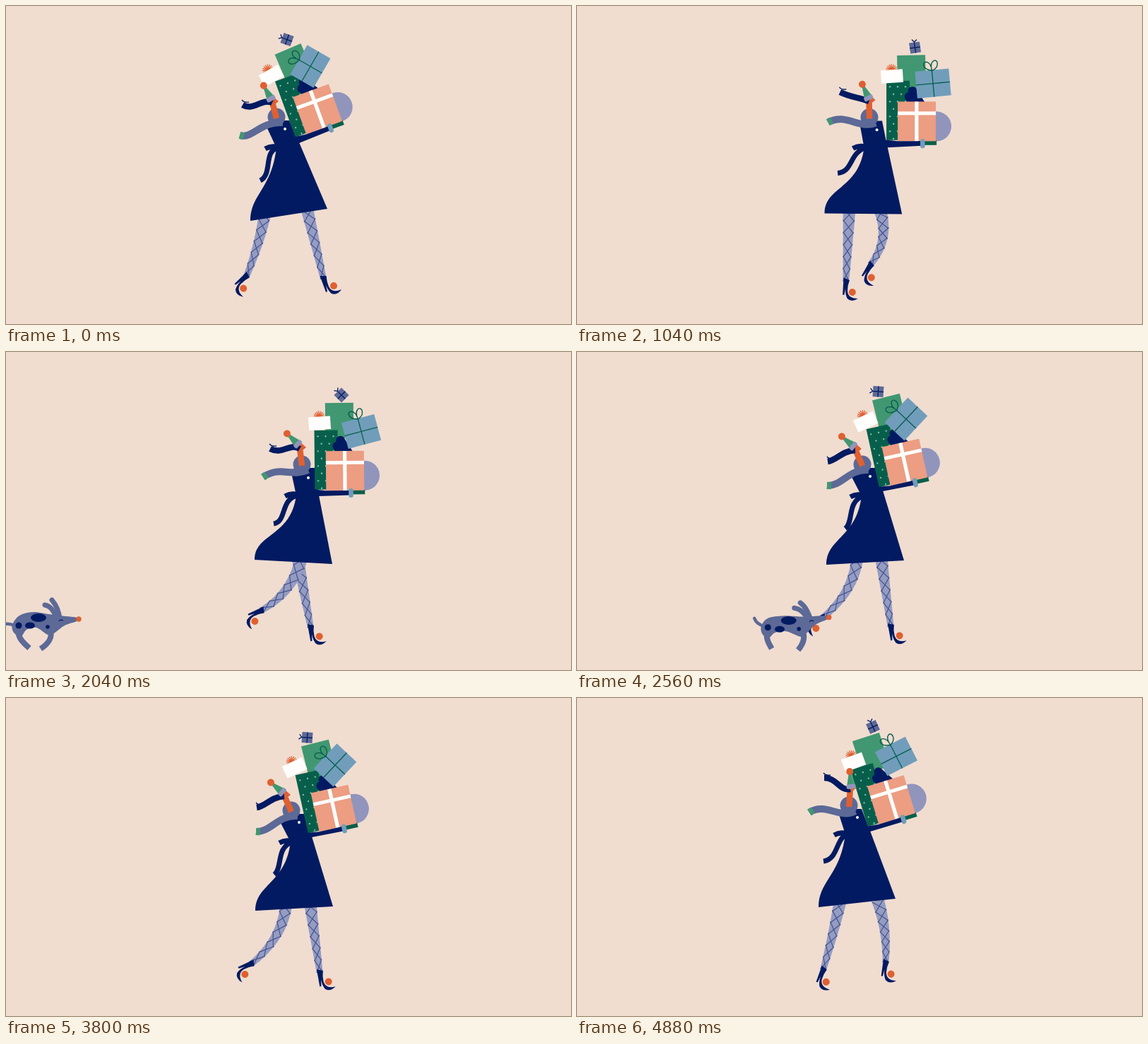
Animation of 800x450 px, one loop 4.92 s. Source, as an HTML page:

```html
<!DOCTYPE html>
<html lang="en">
<head>
<meta charset="utf-8">
<title>Gift walk</title>
<style>
html, body { margin: 0; width: 100%; height: 100%; overflow: hidden; background: #f0ddd0; }
svg { display: block; width: 100vw; height: 100vh; }
</style>
</head>
<body>
<svg id="stage" viewBox="0 0 800 450"></svg>
<script>
const LOOP = 4920, STEP = 40, STRIDE = 31, BOB = 16;
const C = {
  navy: '#021a61', slate: '#5d6996', lilac: '#959cc1', net: '#465390', pine: '#075f4b',
  green: '#419771', blue: '#719dbb', pink: '#ec9d82', ball: '#9195bb', red: '#df6031',
  dot: '#86bba6', white: '#fffefc'
};
const stage = document.getElementById('stage');

// Smooth periodic interpolation through rows of [time, ...values].
function track(period, rows) {
  const n = rows.length;
  const row = i => {
    const lap = Math.floor(i / n), r = rows[i - lap * n];
    return { t: r[0] + lap * period, v: r.slice(1) };
  };
  return p => {
    let i = n - 1;
    while (i > 0 && rows[i][0] > p) i--;
    const [a, b, c, d] = [row(i - 1), row(i), row(i + 1), row(i + 2)];
    const h = c.t - b.t, u = (p - b.t) / h, u2 = u * u, u3 = u2 * u;
    return b.v.map((v, k) => {
      const m0 = (c.v[k] - a.v[k]) / (c.t - a.t), m1 = (d.v[k] - v) / (d.t - b.t);
      return (2 * u3 - 3 * u2 + 1) * v + (u3 - 2 * u2 + u) * h * m0 +
        (3 * u2 - 2 * u3) * c.v[k] + (u3 - u2) * h * m1;
    });
  };
}
const BEATS = [0, 2, 4, 8.5, 13];
const sway = (...rows) => track(BOB, rows.map((r, i) => [BEATS[i], ...r]));

// x, y, angle
const pose = {
  box: sway([441, 146, -20], [464, 156, -12.5], [480, 168, -.5], [494, 171, 6], [445, 144, -17]),
  green: sway([408, 82, -23], [443, 86, -14], [472, 95, -.5], [494, 99, 5], [416, 77, -18]),
  blue: sway([431, 85.5, 30], [466, 95, 43], [503, 112.5, 75], [522, 120, 90], [452, 82.5, 63]),
  white: sway([375.5, 98.5, -29], [408.5, 98.5, -25], [444, 100.5, -4], [465, 103, 2], [391.5, 90.5, -20]),
  small: sway([398, 47.5, 20], [426.5, 56, 4], [475, 61, 45], [499, 66, 82], [419, 41, 65]),
  hat: sway([375, 131, -29], [391, 133, -50], [413, 130, -46], [421, 132, -35], [388, 125, -5]),
  // shoulder, waist left, waist right, hem left, hem right
  coat: sway(
    [369, 171, 383, 200, 415, 193, 346, 304, 455, 287],
    [389, 177, 403, 203, 433, 196, 353, 301, 463, 295],
    [403, 166, 411, 202, 443, 203, 352, 294, 462, 300],
    [411, 166, 417, 203, 449, 204, 354, 293, 464, 299],
    [371, 165, 380, 192, 415, 188, 342, 296, 451, 284]),
  // neck, head, button
  head: sway(
    [383, 157, 377, 136, 395, 174], [404, 159, 394, 138, 415, 176], [419, 159, 416, 136, 428, 178],
    [425, 160, 423, 137, 435, 178], [385, 152, 387, 128, 397, 169]),
  // two controls and the end of each loose strip
  scarf: sway(
    [358, 164, 350, 188, 331, 183], [385, 165, 375, 190, 354, 189], [402, 178, 390, 160, 364, 177],
    [407, 176, 393, 155, 366, 168], [372, 172, 352, 147, 329, 162]),
  hair: sway(
    [362, 130, 351, 149, 335, 140], [375, 140, 368, 153, 355, 155], [402, 128, 392, 146, 374, 137],
    [410, 128, 398, 140, 380, 128], [372, 132, 368, 113, 350, 113]),
  sash: sway(
    [364, 205, 378, 238, 360, 247], [382, 212, 392, 240, 380, 250], [388, 208, 398, 240, 379, 243],
    [392, 212, 400, 238, 378, 240], [366, 200, 370, 228, 349, 231])
};

// hip x, ankle x, ankle y, bend x, bend y, shoe angle
const legA = track(STRIDE, [
  [0, 426, 449, 384, 0, 0, 0], [2, 430, 444, 387, 0, 0, 10], [4, 429, 429, 388, 0, 0, 16],
  [9, 406, 391, 389, 0, 0, 20], [13, 388, 350, 383, 0, 0, 40], [16, 384, 339, 374, 0, 0, 64],
  [20, 420, 363, 365, 16, 14, 85], [24, 428, 401, 362, 28, 6, 62], [29, 426, 437, 373, 8, 0, 28]]);
const legB = track(STRIDE, [
  [0, 408, 449, 380, 0, 0, -2], [4, 412, 431, 388, 0, 0, 10], [9, 390, 391, 389, 0, 0, 20],
  [13, 373, 349, 383, 2, 0, 40], [15, 368, 341, 381, 6, 0, 66], [17, 397, 349, 375, 22, 6, 85],
  [19, 416, 364, 366, 30, 16, 85], [24, 420, 405, 362, 30, 4, 60], [28, 410, 440, 371, 8, 0, 24]]);

const f = n => Math.round(n * 10) / 10;
const fill = (d, c) => `<path d="${d}" fill="${c}"/>`;
const line = (d, c, w, more = '') => `<path d="${d}" fill="none" stroke="${c}" stroke-width="${w}" ${more}/>`;
const disc = (x, y, r, c) => `<circle cx="${f(x)}" cy="${f(y)}" r="${r}" fill="${c}"/>`;
const rect = (x, y, w, h, c, r = 0) => `<rect x="${x}" y="${y}" width="${w}" height="${h}" rx="${r}" fill="${c}"/>`;
const put = ([x, y, a], s) => `<g transform="translate(${f(x)} ${f(y)}) rotate(${f(a)})">${s}</g>`;
const poly = pts => 'M' + pts.map(p => f(p[0]) + ' ' + f(p[1])).join('L');
const curve = (x, y, v) => `M${f(x)} ${f(y)}C${v.map(f).join(' ')}`;

function leg([hx, ax, ay, bx, by, turn]) {
  const hy = 286, cx = (hx + ax) / 2 + bx, cy = (hy + ay) / 2 + by;
  const edge = (t, side) => {
    const s = 1 - t;
    const dx = s * (cx - hx) + t * (ax - cx), dy = s * (cy - hy) + t * (ay - cy);
    const w = side * (9 - 4.6 * t) / Math.hypot(dx, dy);
    return [s * s * hx + 2 * s * t * cx + t * t * ax + dy * w, s * s * hy + 2 * s * t * cy + t * t * ay - dx * w];
  };
  const ts = [...Array(13).keys()].map(i => i / 12);
  const skin = poly([...ts.map(t => edge(t, 1)), ...ts.reverse().map(t => edge(t, -1))]) + 'Z';
  let net = '';
  for (let i = 0; i < 6; i++) {
    const a = i / 6, b = (i + 1.1) / 6;
    net += poly([edge(a, 1), edge(b, -1)]) + poly([edge(a, -1), edge(b, 1)]);
  }
  const shoe = fill('M-4.500-2L4.500-2Q5 6 8 13Q13 23 26 17Q20 26 12 23Q7 19 4 11L6 20L4 21Z', C.navy);
  return fill(skin, C.lilac) + line(net, C.net, 1.2) + put([ax, ay, turn], disc(15, 12, 5, C.red) + shoe);
}

function coat(p) {
  const [sx, sy, lx, ly, rx, ry, hx, hy, kx, ky] = pose.coat(p);
  const [nx, ny] = pose.head(p);
  const skirt = `M${f(lx)} ${f(ly)}C${[lx - 7, ly + 60, hx, hy - 38, hx, hy, kx, ky].map(f).join(' ').replace(/ (\S+ \S+)$/, 'L$1')}L${f(rx)} ${f(ry)}Z`;
  const top = poly([[sx, sy], [nx, ny + 5], [nx + 18, ny + 5], [rx, ry + 1], [lx, ly + 1]]) + 'Z';
  const knot = `M${f(lx + 2)} ${f(ly)}q-9-3-18 2`;
  return line(curve(lx + 2, ly + 1, pose.sash(p)) + knot, C.navy, 7) + fill(skirt, C.navy) + fill(top, C.navy);
}

function gifts(p) {
  const bow = 'M0 0C-4-12-16-10-14-4C-12 0-6 1 0 0C-14 0-16 10-10 11C-4 11-2 6 0 0';
  let dots = '', rays = '';
  for (let r = 0; r < 8; r++)
    for (let c = 0; c < 3; c++) dots += disc(-38 + 11 * c + (r % 2) * 5, -49 + 10.5 * r, 1.2, C.dot);
  for (let i = 0; i < 9; i++) {
    const a = Math.PI * (i / 8);
    rays += `M0-9L${f(-8 * Math.cos(a))} ${f(-9 - 8 * Math.sin(a))}`;
  }
  const small = rect(-7.5, -7.5, 15, 15, C.slate) +
    line('M-8 0H7.500M0-7.500V7.500M-8 0l-3-4M-8 0l-4 3', C.navy, 1.3);
  const green = rect(-20, -23, 40, 50, C.green);
  const blue = rect(-19, -24, 38, 48, C.blue) +
    line('M-19 0H19M0-24V24', C.pine, 1.3) + `<g transform="translate(-18 0)">${line(bow, C.pine, 1.4)}</g>`;
  const white = line(rays, C.red, 1.3) + rect(-15.5, -9, 31, 18.5, C.white);
  const back = disc(28, 7, 21, C.ball) + rect(-43, -57.5, 33, 84, C.pine) + dots + rect(0, 27, 28, 6.5, C.pine);
  const heart = disc(-6, -43, 6.3, C.navy) + disc(-11, -35, 6.3, C.navy) +
    fill('M-15-30L0-45L12-26L-12-26Z', C.navy);
  const pink = rect(-27, -28, 54, 56, C.pink) + rect(-2.8, -28, 5.2, 56, C.white) + rect(-27, -14, 54, 5, C.white);
  const box = pose.box(p);
  return put(pose.small(p), small) + put(pose.green(p), green) + put(box, back + heart) +
    put(pose.blue(p), blue) + put(pose.white(p), white) + put(box, pink);
}

function arm(p) {
  const box = pose.box(p), a = box[2] * Math.PI / 180, [, , , , rx, ry] = pose.coat(p);
  const at = (x, y) => [box[0] + x * Math.cos(a) - y * Math.sin(a), box[1] + x * Math.sin(a) + y * Math.cos(a)];
  const sleeve = poly([at(-43, 26), at(-27, 28), at(7, 28), at(7, 34.5), [rx, ry + 1], [rx - 10, ry - 4]]) + 'Z';
  return fill(sleeve, C.navy) + put(box, rect(5, 25, 6.5, 13, C.blue, 3));
}

function head(p) {
  const [nx, ny, hx, hy, bx, by] = pose.head(p), s = pose.scarf(p), h = pose.hair(p);
  const d = Math.hypot(s[4] - s[2], s[5] - s[3]);
  const tip = poly([[s[4], s[5]], [s[4] - (s[4] - s[2]) / d * 6, s[5] - (s[5] - s[3]) / d * 6]]);
  const face = poly([[hx - 4.5, hy + 3], [hx, hy - 9], [hx + 9, hy - 1], [hx + 4, hy + 3]]) + 'Z';
  const hat = fill('M-5.500-2L5.500-2L1.500-19L-1.500-19Z', C.green) + rect(-6.5, -3, 13, 6.5, C.ball, 2) + disc(0, -21, 5, C.red);
  return line(curve(nx + 9, ny + 8, s), C.slate, 10) + line(tip, C.green, 10) + disc(nx, ny, 12.5, C.slate) +
    line(poly([[hx, hy], [nx, ny + 2]]), C.red, 8.5) + fill(face, C.red) +
    line(curve(hx, hy + 1, h), C.navy, 8.5) +
    line(`M${f(h[4] - 1)} ${f(h[5] - 7)}q3 4 10 3`, C.navy, 1.3) +
    put(pose.hat(p), hat) + disc(bx, by, 2, C.white);
}

// Closed smooth outline through points.
function blob(pts) {
  const n = pts.length, q = i => pts[(i + n) % n];
  let d = `M${f(q(0)[0])} ${f(q(0)[1])}`;
  for (let i = 0; i < n; i++) {
    const [a, b, c, e] = [q(i - 1), q(i), q(i + 1), q(i + 2)];
    d += 'C' + [b[0] + (c[0] - a[0]) / 6, b[1] + (c[1] - a[1]) / 6,
      c[0] - (e[0] - b[0]) / 6, c[1] - (e[1] - b[1]) / 6, c[0], c[1]].map(f).join(' ');
  }
  return d + 'Z';
}

// Each row: gathered x, y, then stretched x, y; x is measured from the nose.
const dogBody = [
  [-94, 386, -99, 392], [-84, 373, -92, 384], [-65, 368, -62, 383], [-42, 371, -34, 381],
  [-28, 373, -22, 376], [-2, 376, -2, 369], [-3, 381, -3, 374], [-20, 387, -16, 383],
  [-35, 398, -24, 396], [-44, 400, -32, 408], [-60, 390, -62, 405], [-74, 393, -80, 404],
  [-82, 403, -92, 407], [-92, 397, -99, 402]];
const dogLegs = [
  [[-85, 394, -92, 398], [-87, 404, -95, 406], [-78, 412, -99, 413], [-70, 419, -101, 421]],
  [[-41, 392, -33, 398], [-36, 403, -27, 404], [-43, 413, -26, 415], [-54, 420, -25, 425]]];
const dogTail = [[-92, 387, -95, 390], [-98, 383, -104, 388], [-102, 386, -106, 376], [-108, 384, -101, 364]];
const dogEars = [
  [[-27, 378, -24, 378], [-28, 366, -32, 374], [-32, 358, -34, 365], [-38, 351, -45, 362]],
  [[-30, 377, -26, 378], [-36, 368, -34, 377], [-38, 360, -40, 370], [-48, 358, -51, 370]]];
const dogSpots = [
  [-57, 376, -57, 387.5, 11, 6], [-85, 387, -89, 394.5, 4.5, 4.5], [-69, 387, -71, 401.5, 7, 4.5], [-44, 389, -40, 397, 2.8, 2.8]];

function dog(t) {
  const nose = 103 + (t - 2040) * 527 / 1080;
  if (nose < -6 || nose > 925) return '';
  const g = .5 - .5 * Math.cos((t - 2040) / 432 * 2 * Math.PI);
  const mix = r => [nose + r[0] + (r[2] - r[0]) * g, r[1] + (r[3] - r[1]) * g];
  const bend = r => {
    const m = r.map(mix);
    return curve(...m[0], m.slice(1).flat());
  };
  const spots = dogSpots.map(s => {
    const [x, y] = mix(s);
    return `<ellipse cx="${f(x)}" cy="${f(y)}" rx="${s[4]}" ry="${s[5]}" fill="${C.navy}"/>`;
  }).join('');
  const [ex, ey] = mix([-25, 380, -24, 382]), [nx, ny] = mix([0, 378, 0, 371]);
  return line(bend(dogTail), C.slate, 4.5, 'stroke-linecap="round"') +
    dogLegs.map(l => line(bend(l), C.slate, 8)).join('') + fill(blob(dogBody.map(mix)), C.slate) + spots +
    dogEars.map(e => line(bend(e), C.slate, 7, 'stroke-linecap="round"')).join('') +
    line(`M${f(ex - 3)} ${f(ey + 1)}q2-3 6-1`, C.navy, 1.2) + disc(nx, ny, 3.7, C.red);
}

function draw(frame) {
  const s = frame % STRIDE;
  // The second step of a stride is one beat shorter.
  let p = s;
  if (s >= BOB) {
    p = s - BOB;
    if (p > 13) p = 13 + (p - 13) * 1.5;
  }
  stage.innerHTML = rect(0, 0, 800, 450, '#f0ddd0') +
    leg(legB((s + 15) % STRIDE)) + leg(legA(s)) + coat(p) + gifts(p) + arm(p) + head(p) + dog(frame * STEP);
}

let start = null, last = -1;
function tick(now) {
  if (start === null) start = now;
  const frame = Math.floor((now - start) % LOOP / STEP);
  if (frame !== last) draw(last = frame);
  requestAnimationFrame(tick);
}
draw(0);
requestAnimationFrame(tick);
</script>
</body>
</html>
```
